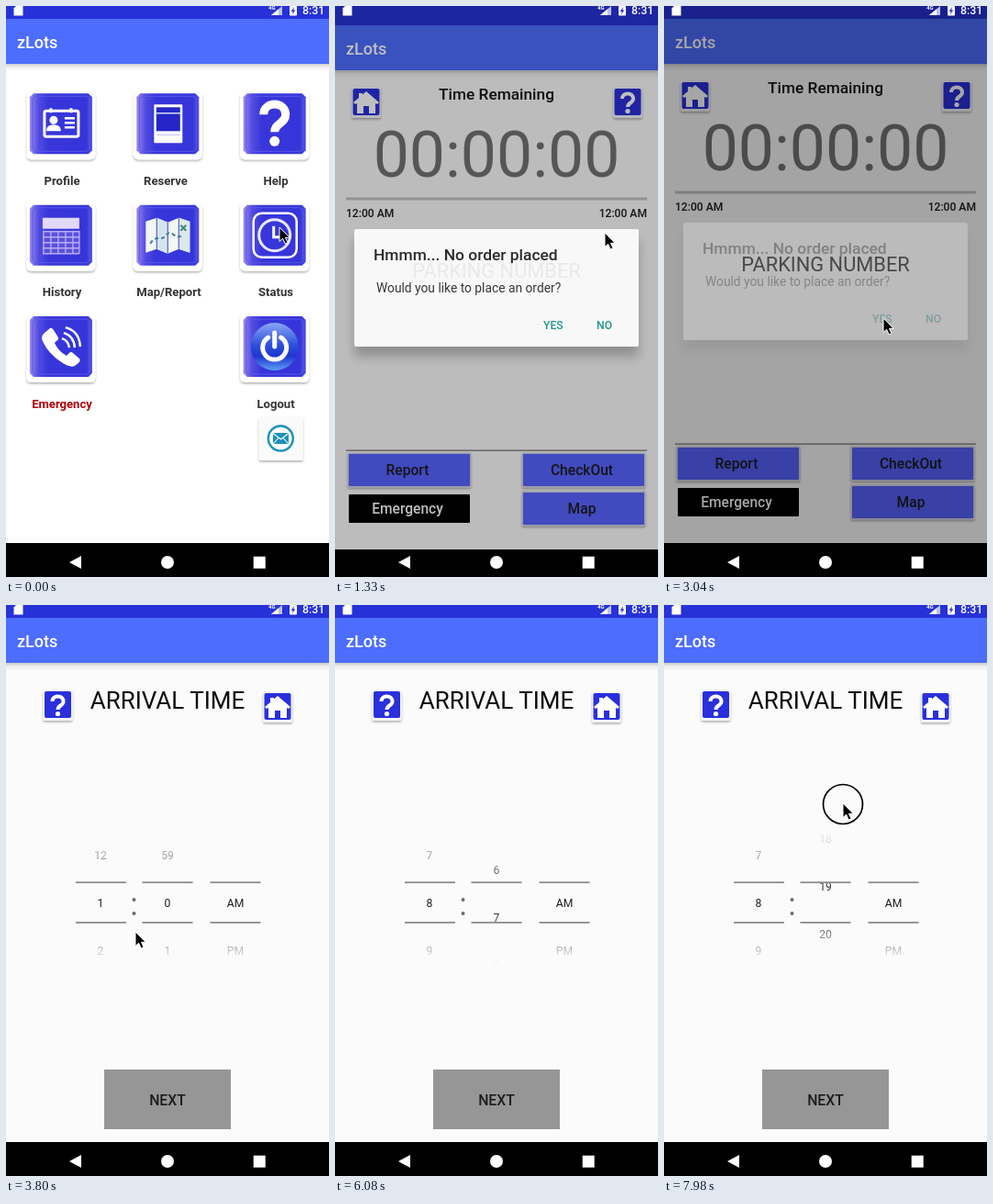
Write an HTML page that moves like this. It is 352x622 px and loops after 8000 ms.

```html
<!DOCTYPE html>
<html lang="en">
<head>
<meta charset="utf-8">
<title>Parking app</title>
<style>
  html, body { margin: 0; width: 100%; height: 100%; overflow: hidden; background: #000; }
  svg { display: block; width: 100%; height: 100%; font-family: Roboto, sans-serif; }
  .medium { font-weight: 500; }
  .bold { font-weight: 700; }
</style>
</head>
<body>
<svg id="stage" viewBox="0 0 352 622"></svg>
<script>
const FRAME = 190, LOOP = 8000;
const BLUE = '#2a30db', INK = '#1c1c1c', BUTTON = '#5862ff';

// Markup helpers
const rect = (x, y, w, h, fill, more = '') =>
  `<rect x="${x}" y="${y}" width="${w}" height="${h}" fill="${fill}" ${more}/>`;
const circle = (x, y, r, fill, more = '') =>
  `<circle cx="${x}" cy="${y}" r="${r}" fill="${fill}" ${more}/>`;
const line = (d, width = 2, color = '#fff', more = '') =>
  `<path d="${d}" fill="none" stroke="${color}" stroke-width="${width}" ${more}/>`;
const shape = (d, fill = '#fff') => `<path d="${d}" fill="${fill}"/>`;
const text = (x, y, size, str, { fill = INK, weight = '', anchor = 'middle' } = {}) =>
  `<text x="${x}" y="${y}" font-size="${size}" fill="${fill}" class="${weight}" text-anchor="${anchor}">${str}</text>`;
const group = (id, body) => `<g id="${id}">${body}</g>`;
const at = (x, y, body) => `<g transform="translate(${x} ${y})">${body}</g>`;

// The status bar reaches above the stage so that it covers the top while sliding in
const screen = (body, background = '#fbfbfb') => rect(0, 0, 352, 640, background) + body
  + rect(0, 63, 352, 9, 'url(#barShade)')
  + rect(0, -20, 352, 34, '#2631d8') + rect(0, 14, 352, 49, '#4c6dfd')
  + text(12, 46, 18, 'zLots', { fill: '#fff', weight: 'medium', anchor: 'start' })
  + rect(0, 585, 352, 60, '#000');

// Menu icons are drawn around the centre of their tile
const icons = {
  profile: rect(-18, -14, 37, 28, 'none', 'rx="2" stroke="#fff" stroke-width="3"')
    + circle(-8, -4, 4.5, '#fff') + shape('M-16 8Q-16 1-8 1T0 8Z')
    + line('M4-6H15M4-1H15M4 4H15', 2.5) + line('M-11-17V-12M11-17V-12', 3),
  reserve: rect(-15, -21, 31, 42, '#fff', 'rx="1"') + rect(-12.5, -18, 26, 26, '#2626c8')
    + line('M-13-11.5H14', 1.5, '#dcdcfa') + line('M-12 12H13', 1, '#b9b9f5'),
  help: line('M-12-10C-12-25 12-25 12-10C12 0 0-1 0 9', 9) + circle(0, 19, 5.5, '#fff'),
  history: rect(-20, -19, 40, 12, '#e2d8f8') + rect(-20, -5, 40, 25, '#5a50de')
    + line('M-20-4H20M-20 2H20M-20 8H20M-20 14H20M-20 20H20M-19-5V20M-11-5V20M-3-5V20M5-5V20M13-5V20M20-5V20', 1.4, '#b8adf2'),
  map: shape('M-24-15L-12-19L0-14L12-19L24-15V19L12 15L0 20L-12 15L-24 19Z', '#f2f6f4')
    + shape('M-12-19L0-14V20L-12 15Z', '#d5e5ee') + shape('M12-19L24-15V19L12 15Z', '#dce8ec')
    + line('M-12-19V15M0-14V20M12-19V15', 1.2, '#5660c8')
    + line('M-19 9C-12-2-8 8-2 0S8 6 16 0', 2, '#3d7c9c', 'stroke-dasharray="4 3"')
    + line('M14-11L20-5M20-11L14-5', 2, '#3f8a78'),
  status: rect(-23, -24, 47, 48, 'none', 'rx="9" stroke="#fff" stroke-width="2.5"')
    + circle(0, 0, 17, 'none', 'stroke="#e8e8ff" stroke-width="3"') + line('M-1-10V2H8', 3),
  emergency: shape('M-19-14L-12-20Q-10-21-8-18L-3-10Q-2-8-5-6L-7-4Q-3 5 6 10L9 7Q11 5 13 7L20 13Q22 15 19 18L15 21Q10 23 2 18Q-14 8-20-6Q-22-11-19-14Z')
    + line('M1-9Q8-7 9 1M3-15Q14-12 15 1M5-21Q20-17 21 0', 2.5),
  logout: circle(0, 0, 26, 'url(#gloss)') + line('M-7-10A13 13 0 1 0 7-10', 5, '#fff', 'stroke-linecap="round"')
    + line('M0-15V0', 5, '#fff', 'stroke-linecap="round"')
};

const tile = (x, y, icon) => at(x, y,
  rect(-37.5, -35, 75, 74, '#fff', 'rx="5" filter="url(#cardShadow)"')
  + shape('M-30-33H30L34-29V29L30 33H-30L-34 29V-29Z', 'url(#tileBlue)')
  + line('M-28-30H28L31-27V27L28 30H-28L-31 27V-27Z', 1, '#5a58e6') + icons[icon]);

const menuItems = [
  ['profile', 'Profile', 0, 0, 61], ['reserve', 'Reserve', 1, 0, 174], ['help', 'Help', 2, 0, 294],
  ['history', 'History', 0, 1, 61], ['map', 'Map/Report', 1, 1, 177.5], ['status', 'Status', 2, 1, 294],
  ['emergency', 'Emergency', 0, 2, 61], ['logout', 'Logout', 2, 2, 294]
];
const menu = screen(menuItems.map(([icon, label, col, row, x]) =>
  tile(59.9 + col * 116.4, 128.3 + row * 121.4, icon)
  + text(x, 194.5 + row * 121.5, 13.1, label, { weight: 'bold', fill: icon === 'emergency' ? '#b00008' : '#333' })
).join('')
  + rect(275.5, 448, 48, 47, '#fafafa', 'rx="2" filter="url(#cardShadow)"')
  + circle(299.3, 471, 13.5, '#fff', 'stroke="#1b91b8" stroke-width="2.4"')
  + rect(291, 465, 17, 12, '#1b91b8') + line('M291 465.5L299.5 472L308 465.5M291 477L297 470.5M308 477L302 470.5', 1.1),
  '#fff');

const badge = (x, y, body) => at(x, y,
  rect(-16, -16, 32, 33, '#f4f4fa', 'rx="2" filter="url(#cardShadow)"')
  + rect(-14.5, -15, 29, 29, BLUE, 'rx="2"') + body);
const homeBadge = (x, y) => badge(x, y,
  shape('M0-12L14 0L12 2L10 1V12H3V4H-3V12H-10V1L-12 2L-14 0L-8-5V-10H-4V-8.5Z'));
const helpBadge = (x, y) => badge(x, y,
  line('M-6-4C-6-11.5 6-11.5 6-4C6 1 0 0 0 5', 4) + circle(0, 9.5, 2.6, '#fff'));

const plainButton = (x, y, w, h, label, fill, color = INK) => rect(x, y, w, h, fill, 'rx="1"')
  + text(x + w / 2 - 2, y + h / 2 + 5.5, 15.6, label, { fill: color, weight: 'medium' });
const button = (x, y, w, h, label) =>
  rect(x - 1.5, y - 1.5, w + 3, h + 3, '#d0d0e4', 'rx="1" filter="url(#cardShadow)"')
  + plainButton(x, y, w, h, label, BUTTON);

const remaining = screen(
  text(176, 95, 17.3, 'Time Remaining', { weight: 'medium', fill: '#111' })
  + homeBadge(34, 98) + helpBadge(319, 98)
  + text(176, 178.7, 69.7, '00:00:00', { fill: '#737373' })
  + rect(12, 201.5, 328, 3, '#c2c2c2')
  + text(12, 223, 12.1, '12:00 AM', { weight: 'medium', anchor: 'start' })
  + text(340, 223, 12.1, '12:00 AM', { weight: 'medium', anchor: 'end' })
  + text(176, 289, 21.8, 'PARKING NUMBER', { fill: '#111' })
  + rect(12, 476.5, 328, 1.3, '#777')
  + button(15, 481, 132, 35, 'Report') + button(205, 481, 132, 35, 'CheckOut')
  + plainButton(15, 525, 132, 31, 'Emergency', '#000', '#fff') + button(205, 523, 132, 35, 'Map'));

const pickerLines = x => rect(x, 301.3, 55, 1.8, '#8c8c8c') + rect(x, 345, 55, 1.8, '#8c8c8c');
const arrival = screen(
  text(176, 113, 26, 'ARRIVAL TIME', { fill: '#0c0c0c' })
  + helpBadge(56.5, 109) + homeBadge(296, 111)
  + group('wheels', '') + [76, 148.5, 222.5].map(pickerLines).join('')
  + circle(139.5, 321, 2, '#6c6c6c') + circle(139.5, 336, 2, '#6c6c6c')
  + rect(107, 506, 138, 65, '#969696')
  + text(176, 545, 15.8, 'NEXT', { weight: 'medium' }));

const dialog = rect(21, 236, 310, 128, '#000', 'opacity=".26" filter="url(#dialogShadow)"')
  + rect(21, 236, 310, 128, '#fff', 'rx="2"')
  + text(42, 270, 17.4, 'Hmmm... No order placed', { weight: 'medium', anchor: 'start' })
  + text(45, 304.5, 13.8, 'Would you like to place an order?', { anchor: 'start', fill: '#2a2a2a' })
  + text(227, 344.5, 12.2, 'YES', { weight: 'medium', anchor: 'start', fill: '#109488' })
  + text(285, 344.5, 12.2, 'NO', { weight: 'medium', anchor: 'start', fill: '#109488' });

const system = shape('M11 0H18.5V10.5H8.5V2.5Z')
  + text(286, 4, 6, '4G', { fill: '#fff', weight: 'bold', anchor: 'start' })
  + shape('M301 0V10H289Z', '#b9c0f5') + shape('M297 3.5V10H289Z')
  + rect(309, 0, 8, 10.5, '#fff', 'rx="1"') + shape('M313.8 1L310.8 6H312.6L312 9.3L315.3 4.4H313.4Z', BLUE)
  + text(323, 9, 12.4, '8:31', { fill: '#fff', weight: 'medium', anchor: 'start' })
  + shape('M69 606L82 599V613Z') + circle(176, 606, 7, '#fff') + rect(269.7, 599.7, 13, 13, '#fff');

const gradient = (id, coords, stops, units = 'objectBoundingBox') =>
  `<linearGradient id="${id}" gradientUnits="${units}" ${coords}>` + stops.map(([offset, color, alpha = 1]) =>
    `<stop offset="${offset}" stop-color="${color}" stop-opacity="${alpha}"/>`).join('') + '</linearGradient>';
const filter = (id, body) => `<filter id="${id}" x="-20%" y="-20%" width="140%" height="150%">${body}</filter>`;

const stage = document.getElementById('stage');
stage.innerHTML = '<defs>'
  + gradient('barShade', 'x2="0" y2="1"', [[0, '#000', .2], [.4, '#000', .06], [1, '#000', 0]])
  + gradient('tileBlue', 'x2="1" y2="0"', [[0, '#9a8cf0'], [.14, '#524ce0'], [.3, '#3836da'], [.9, '#3635da'], [1, '#504ee0']])
  + gradient('gloss', 'x2="0" y2="1"', [[0, '#8aa6f5'], [.45, '#2d52dc'], [.7, '#1e35cf'], [1, '#5fa0f5']])
  + gradient('fade', 'x1="0" x2="0" y1="246" y2="392"',
      [[0, INK, 0], [.48, INK], [.58, INK], [1, INK, 0]], 'userSpaceOnUse')
  + filter('cardShadow', '<feDropShadow dx="0" dy="1.5" stdDeviation="1.2" flood-opacity=".32"/>')
  + filter('dialogShadow', '<feOffset dy="11"/><feGaussianBlur stdDeviation="6"/>')
  + '</defs>'
  + group('menu', menu) + group('remaining', remaining) + group('arrival', arrival)
  + group('popup', rect(0, 0, 352, 640, '#000', 'id="dim"') + group('dialog', dialog))
  + group('system', system)
  + group('pointer', circle(0, 1, 21.5, 'none', 'id="ring" stroke="#000" stroke-width="1.7"')
    + '<path d="M0 0V15.5L3.6 12.3L6.2 18L9 16.8L6.5 11.3H11.2Z" stroke="#fff" stroke-width="1"/>');
const el = Object.fromEntries([...stage.querySelectorAll('[id]')].map(node => [node.id, node]));

// Motion tables: [time, value, ...]
const pointerPath = [
  [0, 298, 241], [760, 298, 241], [1330, 294, 247], [2280, 263, 337], [2660, 239, 340], [3230, 239, 340],
  [3800, 141, 356], [4180, 104, 372], [4560, 106, 232], [5320, 174, 372], [5700, 176, 372], [6080, 182, 225],
  [6650, 188, 372], [6840, 188, 372], [7220, 193, 226], [7600, 192, 370], [7980, 195, 216]
];
const hours = [[4180, 1], [4560, 4], [4750, 5.6], [4940, 6.9], [5130, 7.6], [5320, 8]];
const minutes = [[5700, 0], [5890, 3.4], [6080, 6.69], [6270, 8.6], [6650, 10], [6840, 10],
  [7220, 13], [7410, 15.3], [7600, 16.4], [7980, 19.35]];
const dimming = [[1140, 0], [1330, .25], [1710, .6], [2850, .6], [3040, .35], [3230, 0]];
const dialogAlpha = [[1140, 0], [1330, .91], [1520, 1], [2850, 1], [3040, .25], [3230, 0]];
const presses = [[4180, 4560], [5700, 5890], [6840, 7220], [7600, 7980]];

function sample(table, t, column = 1) {
  const next = table.findIndex(key => key[0] > t);
  if (next < 0) return table[table.length - 1][column];
  if (next === 0) return table[0][column];
  const a = table[next - 1], b = table[next];
  return a[column] + (b[column] - a[column]) * (t - a[0]) / (b[0] - a[0]);
}

const wheelText = (x, row, value, label) =>
  text(x, 328.8 + (row - value) * 52, 12.2, label, { fill: 'url(#fade)' });
function wheel(x, value, label) {
  const middle = Math.round(value);
  return [-1, 0, 1].map(step => wheelText(x, middle + step, value, label(middle + step))).join('');
}

const show = (node, visible) => node.setAttribute('display', visible ? 'inline' : 'none');
const shift = (node, x, y) => node.setAttribute('transform', `translate(${x} ${y})`);

function render(t) {
  show(el.menu, t < 1330);
  show(el.remaining, t >= 1330 && t < 3420);
  show(el.arrival, t >= 3230);
  show(el.popup, t >= 1330 && t < 3230);

  const enter = t < 1520 ? 7 : 0;
  shift(el.remaining, 0, enter);
  shift(el.dialog, 0, enter);
  shift(el.arrival, 0, t < 3420 ? 7 : 0);
  el.dim.setAttribute('opacity', sample(dimming, t));
  el.dialog.setAttribute('opacity', sample(dialogAlpha, t));

  el.wheels.innerHTML = wheel(103, sample(hours, t), n => (n + 11) % 12 + 1)
    + wheel(176, sample(minutes, t), n => (n + 60) % 60)
    + wheelText(250, 0, 0, 'AM') + wheelText(250, 1, 0, 'PM');

  shift(el.pointer, sample(pointerPath, t), sample(pointerPath, t, 2));
  show(el.pointer, t < 6080 || t >= 6270);
  show(el.ring, presses.some(([down, up]) => t >= down && t <= up));
}

const start = performance.now();
function tick() {
  const time = (performance.now() - start) % LOOP;
  render(Math.floor(time / FRAME) * FRAME);
  requestAnimationFrame(tick);
}
tick();
</script>
</body>
</html>
```
